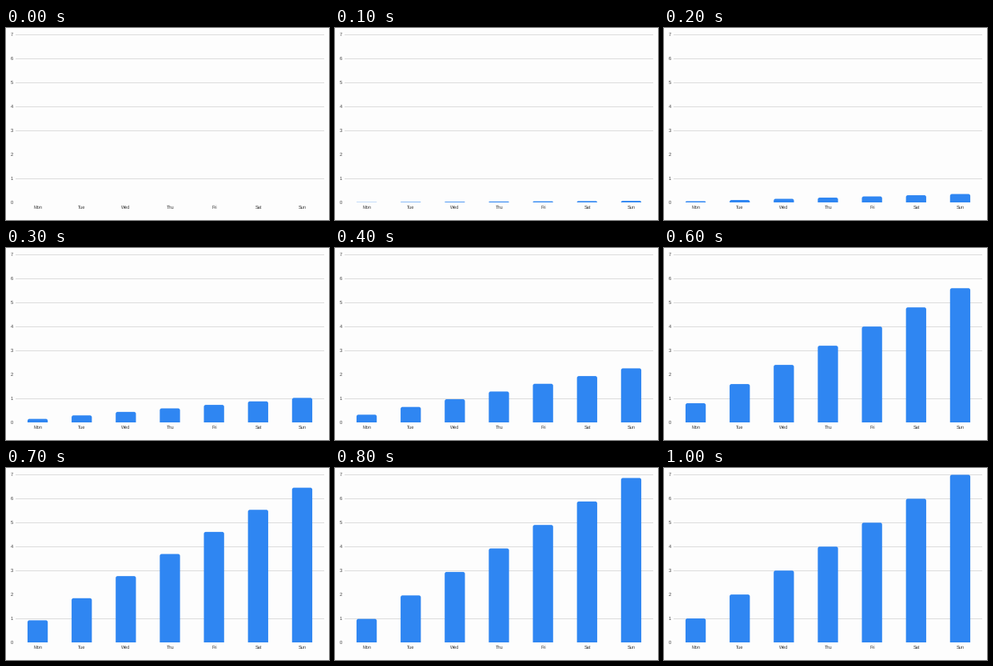
Recreate the animation shown at these times as a matplotlib script. Size 404 px wide and 240 px high, loop 2.6 s.

```python
import matplotlib.pyplot as plt
from matplotlib.animation import FuncAnimation
from matplotlib.patches import PathPatch
from matplotlib.path import Path

W, H, DPI = 404, 240, 100
STEP, FRAMES = 100, 26
LEFT, RIGHT, TOP, BASE = 12, 398, 8.5, 218
DAYS = ["Mon", "Tue", "Wed", "Thu", "Fri", "Sat", "Sun"]
TOP_VALUE = len(DAYS)
UNIT = (BASE - TOP) / TOP_VALUE
SLOT = (RIGHT - LEFT) / len(DAYS)
BAR_W, RADIUS = 25.3, 2.4
GROW_MS, LEAD_MS = 1000, 32

plt.rcParams["text.hinting"] = "none"
plt.rcParams["font.family"] = "Liberation Sans"

fig = plt.figure(figsize=(W / DPI, H / DPI), dpi=DPI, facecolor="#fdfdfd")
ax = fig.add_axes([0, 0, 1, 1])
ax.set_xlim(0, W)
ax.set_ylim(H, 0)
ax.axis("off")


def px(n):
    """Pixels to points."""
    return n * 72 / DPI


def label(x, y, text, ha):
    ax.text(x, y, text, ha=ha, va="baseline", fontsize=px(5.6), color="#3a3a3a")


def ease(p):
    """Cubic ease in and out."""
    return 4 * p**3 if p < 0.5 else 1 - 4 * (1 - p) ** 3


def bar_path(x, height):
    """Bar standing on the base line with rounded top corners."""
    l, r, t = x - BAR_W / 2, x + BAR_W / 2, BASE - height
    c = min(RADIUS, height)
    points = [(l, BASE), (l, t + c), (l, t), (l + c, t),
              (r - c, t), (r, t), (r, t + c), (r, BASE), (l, BASE)]
    codes = [Path.MOVETO, Path.LINETO, Path.CURVE3, Path.CURVE3,
             Path.LINETO, Path.CURVE3, Path.CURVE3, Path.LINETO, Path.CLOSEPOLY]
    return Path(points, codes)


for value in range(TOP_VALUE + 1):
    y = BASE - value * UNIT
    label(8.8, y + 1.9, str(value), "right")
    if value not in (0, 2):
        row = int(y) + 0.5
        ax.plot([LEFT, RIGHT], [row, row], color="#dcdcdc", lw=px(1),
                solid_capstyle="butt", snap=False, zorder=1)

centers = [LEFT + SLOT * (i + 0.5) for i in range(len(DAYS))]
bars = []
for x, day in zip(centers, DAYS):
    label(x + 0.3, 226, day, "center")
    bar = PathPatch(bar_path(x, 0), facecolor="#2f86f2", lw=0,
                    snap=False, zorder=2)
    bars.append(ax.add_patch(bar))


def update(frame):
    p = min(1, (frame * STEP + LEAD_MS) / GROW_MS) if frame else 0
    for i, (x, bar) in enumerate(zip(centers, bars)):
        bar.set_path(bar_path(x, (i + 1) * UNIT * ease(p)))
    return bars


anim = FuncAnimation(fig, update, frames=FRAMES, interval=STEP,
                     repeat=True, repeat_delay=0, blit=False)
plt.show()
```
